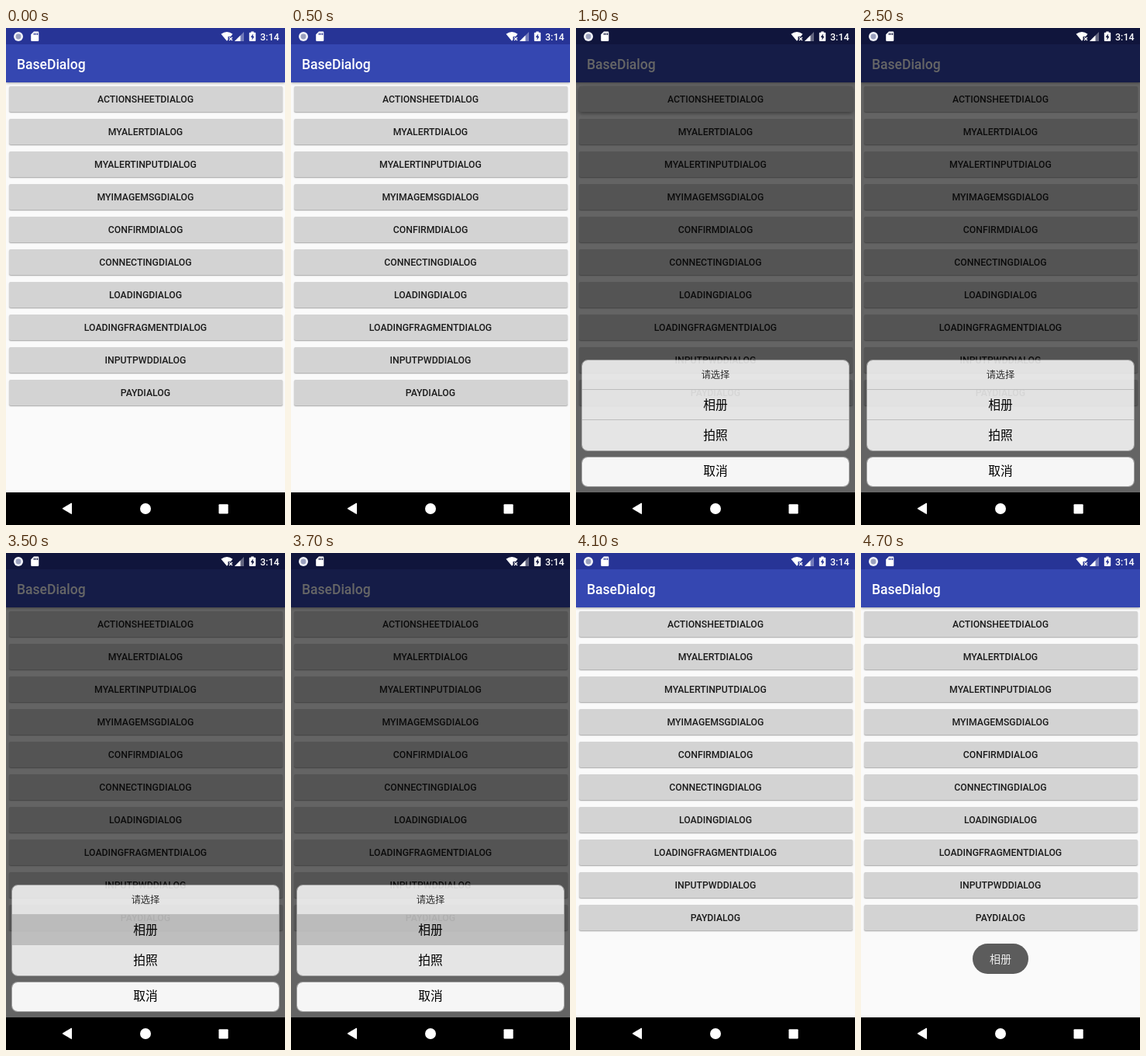
These frames come from a looping animation (360x640 px, 5300 ms). An HTML page:

```html
<!DOCTYPE html>
<html lang="zh-CN">
<head>
<meta charset="utf-8">
<title>BaseDialog</title>
<style>
html, body { margin: 0; width: 100%; height: 100%; overflow: hidden; }
body {
  --loop: 5300ms step-end infinite;
  background: #fafafa;
  font: 500 12.25px/1 Roboto, sans-serif;
}
.stage { position: relative; width: 360px; height: 640px; overflow: hidden; background: #fafafa; }
.stage > * { position: absolute; }

.status { left: 0; top: 0; width: 360px; height: 21px; background: #273496; }
.bar {
  left: 0; top: 21px; width: 346px; height: 49px; padding-left: 14px;
  background: #3547b1; color: #fff; font-size: 17.5px; line-height: 53px;
  box-shadow: 0 1px 3px rgba(0, 0, 0, .35);
}
.list { left: 3.5px; top: 75px; width: 353px; }
.list div {
  height: 32.5px; margin-bottom: 9.5px; border-radius: 2px;
  background: #d3d3d3; color: #1c1c1c; line-height: 35px; text-align: center;
  box-shadow: 0 1px 1.5px rgba(0, 0, 0, .34);
}
.list div:first-child { animation: lift var(--loop); }
.nav { left: 0; top: 598px; width: 360px; height: 42px; background: #000; }
.scrim { left: 0; top: 0; width: 360px; height: 598px; background: #000; opacity: 0; animation: dim var(--loop); }

.sheet {
  left: 7px; top: 427px; width: 346px; visibility: hidden;
  color: #000; text-align: center;
  font: 400 15.75px/38px "Noto Sans CJK SC", "Noto Sans CJK", sans-serif;
  animation: sheet var(--loop);
}
/* The translucent border gives both panels a soft edge */
.group, .cancel {
  box-sizing: border-box; border: 1px solid rgba(255, 255, 255, .4); border-radius: 8px;
  background-clip: padding-box; overflow: hidden;
}
.group { height: 118px; }
.group div { box-sizing: border-box; height: 40px; background: rgba(255, 255, 255, .83); background-clip: padding-box; }
.group div + div { border-top: 1px solid #bdbdbd; }
.group .title { height: 37px; font-size: 12.25px; line-height: 36px; color: #333; }
.group .pick { height: 39px; animation: press var(--loop); }
.cancel { height: 39px; margin-top: 7px; background-color: rgba(255, 255, 255, .94); line-height: 34px; }

.toast {
  left: 144px; top: 503px; width: 72px; height: 39px; border-radius: 19.5px;
  background: #5c5c5c; color: #ececec; text-align: center; opacity: 0;
  font: 400 14px/39px "Noto Sans CJK SC", "Noto Sans CJK", sans-serif;
  animation: toast var(--loop);
}
.icons { left: 0; top: 0; }

@keyframes lift {
  18.867%, 28.301% { box-shadow: 0 2px 5px rgba(0, 0, 0, .42); }
  30.188%, 100% { box-shadow: 0 1px 1.5px rgba(0, 0, 0, .34); }
}
@keyframes dim {
  0% { opacity: 0; }
  28.301% { opacity: .6; }
  73.584% { opacity: .2; }
  77.358%, 100% { opacity: 0; }
}
@keyframes sheet {
  0% { visibility: hidden; transform: none; }
  28.301% { visibility: visible; transform: none; }
  73.584% { visibility: visible; transform: translateY(152px); }
  77.358%, 100% { visibility: hidden; transform: translateY(213px); }
}
@keyframes press {
  0% { background-color: rgba(255, 255, 255, .83); }
  66.037%, 100% { background-color: rgba(208, 208, 208, .83); }
}
@keyframes toast {
  0% { opacity: 0; }
  81.131% { opacity: .5; }
  84.905% { opacity: .85; }
  88.679%, 100% { opacity: 1; }
}
</style>
</head>
<body>
<div class="stage">
  <div class="list">
    <div>ACTIONSHEETDIALOG</div>
    <div>MYALERTDIALOG</div>
    <div>MYALERTINPUTDIALOG</div>
    <div>MYIMAGEMSGDIALOG</div>
    <div>CONFIRMDIALOG</div>
    <div>CONNECTINGDIALOG</div>
    <div>LOADINGDIALOG</div>
    <div>LOADINGFRAGMENTDIALOG</div>
    <div>INPUTPWDDIALOG</div>
    <div>PAYDIALOG</div>
  </div>
  <div class="bar">BaseDialog</div>
  <div class="status"></div>
  <div class="nav"></div>
  <div class="scrim"></div>
  <div class="sheet">
    <div class="group">
      <div class="title">请选择</div>
      <div class="pick">相册</div>
      <div>拍照</div>
    </div>
    <div class="cancel">取消</div>
  </div>
  <div class="toast">相册</div>

  <!-- System icons stay above the dimmed layer -->
  <svg class="icons" width="360" height="640" fill="#fff">
    <circle cx="16" cy="11" r="6" fill="#f2f3fa"/>
    <circle cx="16" cy="11" r="3.4" fill="#9aa0bd"/>
    <path fill-rule="evenodd" d="M36 4.5h5q1.3 0 1.3 1.3v10q0 1.3-1.3 1.3h-7.5q-1.3 0-1.3-1.3V8.3zM35.8 6.500v2.600h1.2V6.500zM37.900 6.500v2.600h1.2V6.500zM40 6.500v2.600h1.2V6.500z"/>
    <path d="M277.500 7.800Q285 2.300 292.500 7.800L290 10.900H286.500V15L285 16.800z"/>
    <path d="M288 12l4 4m0-4l-4 4" stroke="#fff" stroke-width="1.2"/>
    <path d="M307 5v12h-12z" opacity=".35"/>
    <path d="M302.500 9.500V17H295z"/>
    <path fill-rule="evenodd" d="M316.300 4.500h3.400v1.300h1.500q1 0 1 1v9.300q0 1-1 1h-6.400q-1 0-1-1V6.800q0-1 1-1h1.500zM318.700 7.500l-3 4.500h1.800v3.500l3-4.700h-1.800z"/>
    <text x="328" y="15.600" font-size="12.500">3:14</text>
    <path d="M73 618.800L84.500 612v13.600z" stroke="#fff" stroke-linejoin="round"/>
    <circle cx="180" cy="619" r="7"/>
    <rect x="274.500" y="613.200" width="12.200" height="12.200" rx="1"/>
  </svg>
</div>
</body>
</html>
```
